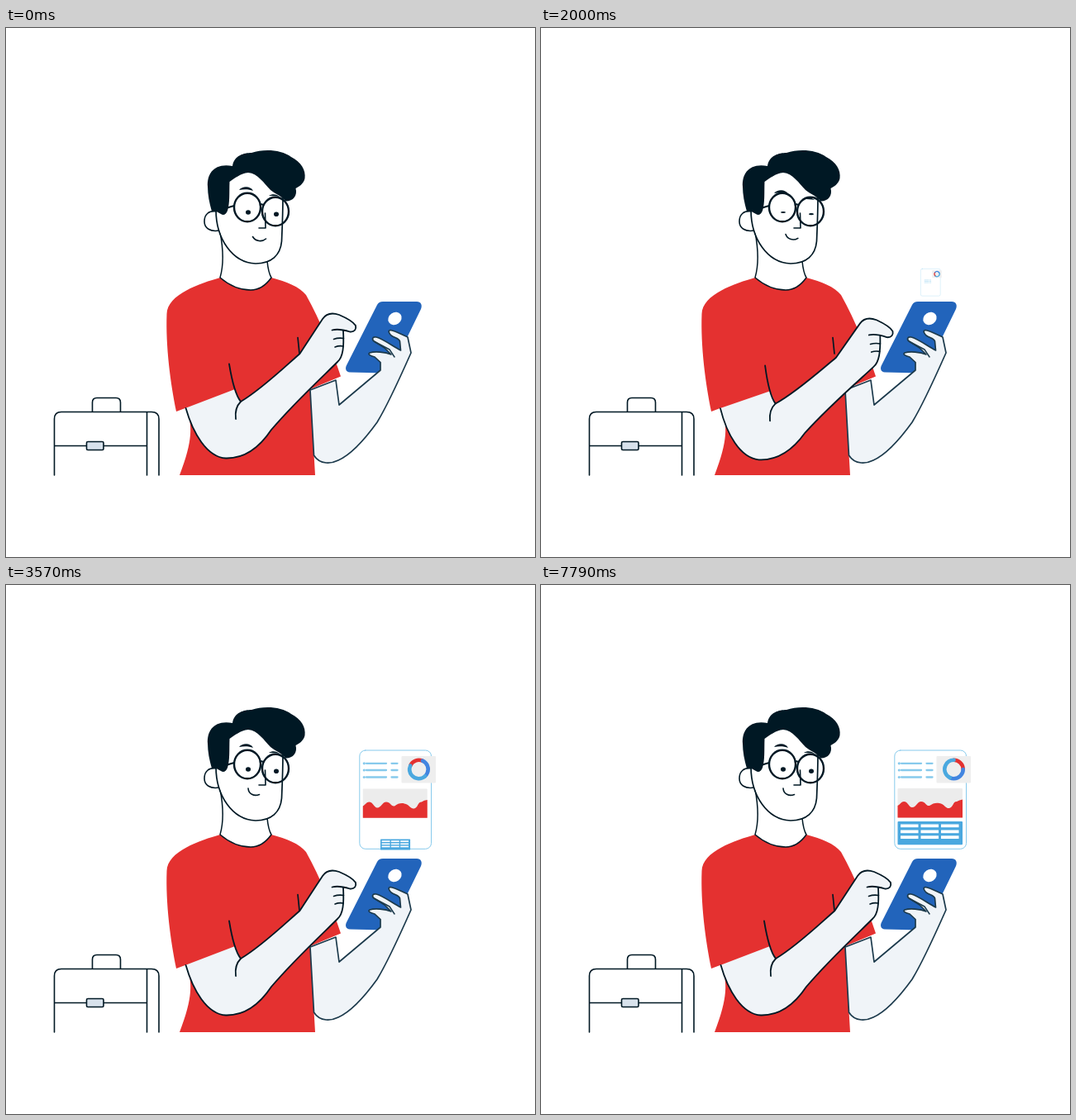
These frames come from a looping animation (640x640 px, 9.57 s). An HTML page with a canvas:

```html
<!DOCTYPE html>
<html lang="en">
<head>
<meta charset="utf-8">
<title>Report on a phone</title>
<style>
html, body { margin: 0; width: 100%; height: 100%; overflow: hidden; background: #fff; }
canvas { display: block; width: 640px; height: 640px; }
</style>
</head>
<body>
<canvas id="stage" width="640" height="640"></canvas>
<script>
const ctx = document.getElementById('stage').getContext('2d');
const LOOP = 9570, FPS = 14;
const INK = '#001824', EDGE = '#1c3a4c', SKIN = '#f0f4f8', RED = '#e43130',
      BLUE = '#2264bb', SKY = '#4aa8df', PALE = '#87caec', GREY = '#ececec', WHITE = '#fff';

const clamp = x => Math.max(0, Math.min(1, x));
const progress = (t, from, to) => clamp((t - from) / (to - from));
const ease = x => (1 - Math.cos(Math.PI * x)) / 2;
const lerp = (a, b, k) => a + (b - a) * k;

function shape(d, fill, stroke, width = 1.7) {
  const path = new Path2D(d);
  if (fill) { ctx.fillStyle = fill; ctx.fill(path); }
  if (stroke) { ctx.strokeStyle = stroke; ctx.lineWidth = width; ctx.stroke(path); }
}

function oval(x, y, rx, ry, fill, stroke, width, tilt = 0) {
  ctx.beginPath();
  ctx.ellipse(x, y, rx, ry, tilt, 0, Math.PI * 2);
  if (fill) { ctx.fillStyle = fill; ctx.fill(); }
  if (stroke) { ctx.strokeStyle = stroke; ctx.lineWidth = width; ctx.stroke(); }
}

function box(x, y, w, h, r, fill, stroke, width = 1.6) {
  ctx.beginPath();
  ctx.roundRect(x, y, w, h, r);
  if (fill) { ctx.fillStyle = fill; ctx.fill(); }
  if (stroke) { ctx.strokeStyle = stroke; ctx.lineWidth = width; ctx.stroke(); }
}

function group(move, draw) {
  ctx.save();
  move();
  draw();
  ctx.restore();
}

function briefcase() {
  shape('M58.5 541V473Q58.5 464.5 67 464.5H176Q185 464.5 185 473V541M170.5 465V541M58.5 505.5H170.5', null, INK, 1.6);
  shape('M104.5 464V453Q104.5 447.5 110 447.5H133Q138.5 447.5 138.5 453V464', null, INK, 1.6);
  box(97.5, 500.5, 20.5, 10, 1.5, '#d8e2ec', INK);
}

function torso() {
  shape('M259 302C235 309 195 322 194.500 346C193 385 199 430 206 464L218 459.500C226 480 226 500 210 541H374L368 437L405 421.500C395 392 381 355 363 323C355 313 340 307 321 302Z', RED);
  shape('M259 247C263 268 264 285 259 302C272 313 285 317 296 317C308 317 316 309 321 302C318 297 317 292 316 282Z', WHITE);
  shape('M259 247C263 268 264 285 259 302C272 313 285 317 296 317C308 317 316 309 321 302C318 297 317 292 316 282', null, INK, 1.5);
  shape('M353 374.500L355 394', null, INK);
}

function phoneArm() {
  shape('M456 331H497C502 331 504 335 502 340L467 412Q464 417.500 458 417.500L416 416.500C411 416 410 412 412 408L449 335Q451 331 456 331Z', BLUE);
  oval(470.500, 351.500, 8.600, 7.300, WHITE, null, 0, -0.6);
  shape('M368 438L372.500 517C380 529 394 527 402 523C420 515 436 495 449 477C463 454 478 420 490 393L486 374C479 371 470 366 465 365.500C462 366 463 369 466 372C470 375 475 375 476.500 379L477.500 390C468 385 456 376 448 374C443 373 442 377 446 379.500L458 387C461 390 463 392 466 395C459 392 446 391 440 393C437 395 442 397 446 398L453 404.500L453 414L403 456L399 426Z', SKIN, EDGE);
  shape('M446 379.500L464 389L470 398', null, EDGE, 1.5);
}

function face(t) {
  shape('M256 222C245 220 240 226 240 234C240 242 247 247 258 245', WHITE, INK, 1.6);
  shape('M254 215C254 255 274 284 302 285C321 285 332 275 333.500 258C334 246 335 225 335 203L293 175L268 185Z', WHITE);
  shape('M254 220C254 255 274 284 302 285C321 285 332 275 333.500 258C334 246 335 225 335 203', null, INK, 1.7);
  shape('M244 192C243 176 252 163 274 167C276 154 288 151 297 151C312 146 333 147 345 156C357 162 363 172 361.500 182C360 189 354 192 350.500 194C353 203 347 210 338 209.500C335 204 326 201 320 196C312 188 305 176 293 175C284 176 276 182 270.500 186C270 199 271 212 268 221C266 226 263 227 260 225C256 222 252 221 249 222C246 212 244 201 244 192Z', INK);

  const lowered = ease(progress(t, 0, 1.07)) - ease(progress(t, 1.95, 2.95));
  group(() => ctx.translate(0, 4 * lowered), () => {
    shape('M282 196C286 191 296 191 299 197C294 195 288 195 282 196Z', INK);
    shape('M318 203C322 200 328 201 331 204C326 203 322 203 318 203Z', INK);
  });

  oval(292, 217, 16, 17.300, null, INK, 2.4);
  oval(326, 222, 16, 17.300, null, INK, 2.4);
  shape('M276 215L266 218M307.500 214Q309 212.500 311 214', null, INK, 2);
  shape('M313.500 224L314 242H306', null, INK, 1.6);

  const blink = (from, to) => Math.sin(Math.PI * progress(t, from, to));
  const closed = Math.max(blink(1.85, 2.45), blink(6, 6.64), blink(7.21, 7.79));
  const lid = 2.8 * (1 - 0.85 * closed);
  oval(293, 223, 3, lid, INK);
  oval(327, 225.200, 3, lid, INK);

  const k = ease(progress(t, 1.07, 3.05));
  ctx.beginPath();
  ctx.moveTo(lerp(298.500, 293, k), lerp(252.500, 246, k));
  ctx.bezierCurveTo(lerp(302, 293.500, k), lerp(258.500, 253, k),
                    lerp(310, 300, k), lerp(259, 256, k),
                    lerp(314.500, 306.500, k), lerp(255, 253.500, k));
  ctx.strokeStyle = INK;
  ctx.lineWidth = 1.6;
  ctx.stroke();
}

function tappingArm(t) {
  const press = ease(progress(t, 0, 1.07)) - ease(progress(t, 1.07, 2.9));
  const turn = () => {
    ctx.translate(207, 443);
    ctx.rotate(0.065 * press);
    ctx.translate(-207, -443);
  };
  const outer = 'C226 490 243 519 266 520.500C291 521 309 504 321 486C350 452 385 420 401 404C408 398 409 385 408 366';
  const finger = 'L416 367.500C422 368 424 364 423 360C420 355 410 350 403 347C394 344 387 346 383 352L355.500 394C335 412 308 438 284 452';
  group(turn, () => {
    shape('M217.500 459.800' + outer + finger + 'L277 437Z', SKIN);
    shape('M217.500 459.800' + outer, null, INK, 1.8);
    shape('M394.500 365.500C400 364 408 365 416 367.500' + finger.slice(10) + 'C279 457 277 465 278 473', null, INK, 1.8);
    shape('M270 406.500C273 425 277 443 284 452', null, INK, 1.8);
    shape('M396.500 376.500Q402 374.500 408.500 375.500M398 386Q403 384 408 385', null, INK, 1.6);
  });
}

// Every panel of the report grows out of the top of the phone.
function popUp(t, start, draw) {
  const s = progress(t, start, start + 1.2);
  if (!s) return;
  group(() => {
    ctx.translate(471.300, 326);
    ctx.scale(s, s);
    ctx.translate(-471.300, -326);
  }, draw);
}

function ring(t) {
  box(478.500, 207, 41.500, 32.500, 1, '#eee');
  const turn = 46.6 * (Math.min(t, 5) - 5) - 90;
  const rad = a => (a + turn) * Math.PI / 180;
  for (const [from, to, color] of [[0, 90, RED], [90, 205, '#4285e0'], [205, 360, SKY]]) {
    ctx.beginPath();
    ctx.arc(499.500, 223, 11.200, rad(from), rad(to));
    ctx.strokeStyle = color;
    ctx.lineWidth = 4.6;
    ctx.stroke();
  }
}

function report(t) {
  popUp(t, 1.67, () => {
    box(427.800, 200, 86.700, 119.300, 7, WHITE, PALE, 1);
    ring(t);
  });
  popUp(t, 1.77, () => {
    for (const y of [215.800, 224, 232.500]) {
      oval(433.300, y, 1.6, 1.6, PALE);
      shape(`M436 ${y}H460M466.500 ${y}H473.500`, null, PALE, 2.3);
    }
  });
  popUp(t, 2.38, () => {
    box(431.500, 246, 78.500, 35.500, 1, GREY);
    shape('M431.500 267C435 265 436 262 439 262C444 262 445 269 449 269C454 269 455 262 460 262C465 262 466 268 470 267C474 264 478 263 482 264C488 265 490 271 494 270C499 269 498 262 503 262Q506 260 510 259.500V281.500H431.500Z', RED);
  });
  popUp(t, 3.02, () => {
    box(431.500, 286, 78.500, 28.300, 1, SKY);
    for (const x of [435, 459.500, 484])
      for (const y of [289.500, 296.500, 303.300]) box(x, y, 21.500, 3.700, 0, WHITE);
  });
}

function render(ms) {
  const t = Math.floor((ms + 9) * FPS / 1000) / FPS;
  ctx.fillStyle = WHITE;
  ctx.fillRect(0, 0, 640, 640);
  ctx.lineCap = ctx.lineJoin = 'round';
  briefcase();
  torso();
  face(t);
  phoneArm();
  tappingArm(t);
  report(t);
}

const begin = performance.now();
function tick() {
  render((performance.now() - begin) % LOOP);
  requestAnimationFrame(tick);
}
tick();
</script>
</body>
</html>
```
